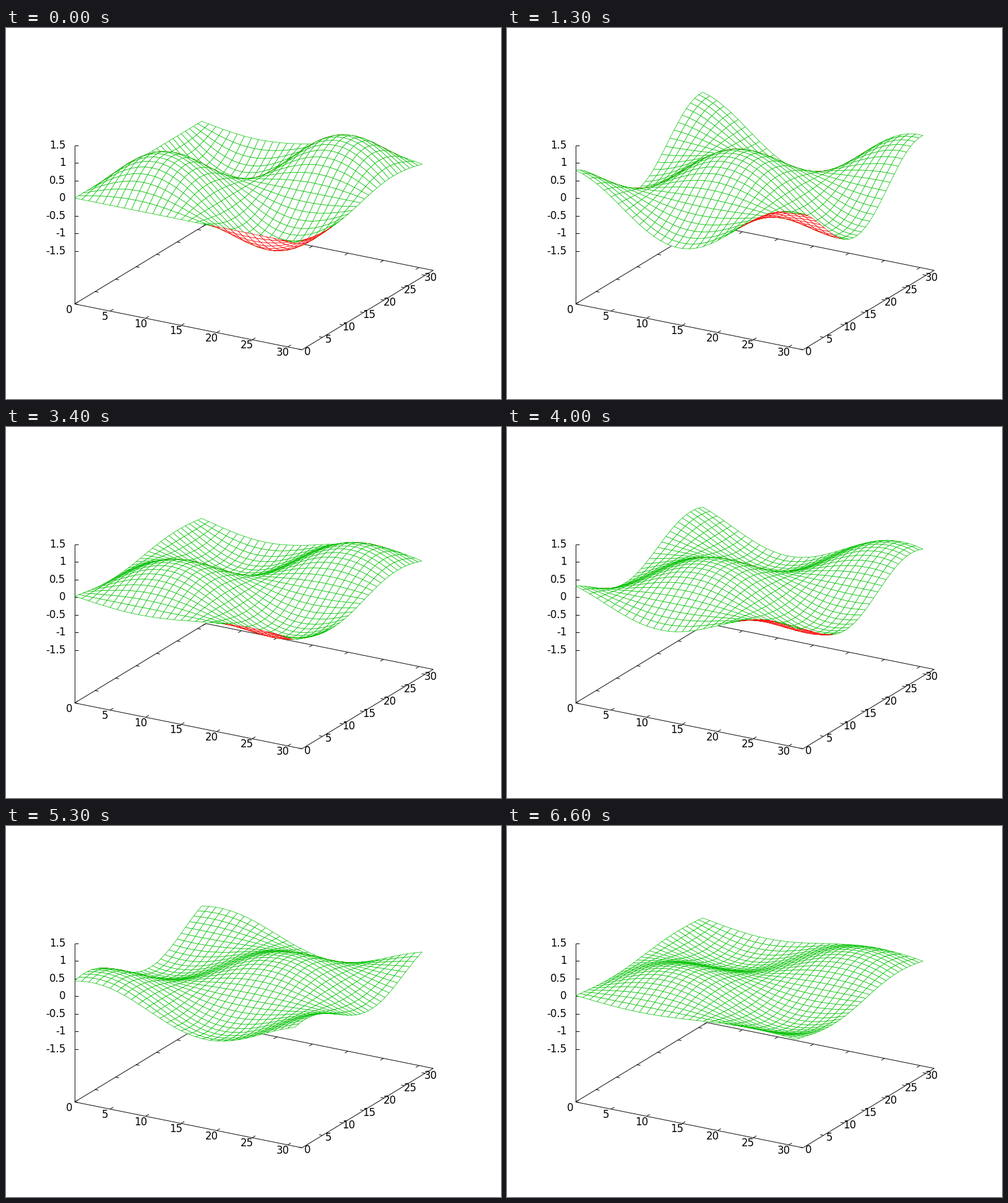
Animation, 800 px wide and 600 px high, one loop 6700 ms. Source, as a matplotlib script:

```python
import numpy as np
import matplotlib.pyplot as plt
from matplotlib.animation import FuncAnimation
from matplotlib.collections import LineCollection, PolyCollection

W, H, DPI = 800, 600, 100
PX = 72 / DPI
N = 32
FRAMES, INTERVAL = 67, 100
GREEN, RED = "#00c000", "#ff0000"

# Orthographic view: screen pixels per data unit along each axis
ORIGIN = np.array([110.4, 274.6])
EX = np.array([367.4, 74.1]) / N
EY = np.array([212.1, -128.4]) / N
EZ = np.array([0, -57.06])
FLOOR = -3


def project(x, y, z):
    x, y, z = (np.asarray(v, float)[..., None] for v in (x, y, z))
    return ORIGIN + x * EX + y * EY + z * EZ


def unit(v):
    return v / np.hypot(*v)


fig = plt.figure(figsize=(W / DPI, H / DPI), dpi=DPI, facecolor="white")
ax = fig.add_axes([0, 0, 1, 1])
ax.set_xlim(-0.5, W - 0.5)
ax.set_ylim(H - 0.5, -0.5)
ax.axis("off")


def label(x, y, text, ha="center"):
    ax.text(x, y + 6, text, ha=ha, va="baseline", color="black",
            family="DejaVu Sans", fontsize=12)


def draw_axes():
    base = [project(x, y, FLOOR)
            for x, y in ((0, 0), (N, 0), (N, N), (0, N), (0, 0))]
    segs = [base, [project(0, 0, FLOOR), project(0, 0, 1.5)]]
    along_x, along_y = 5.5 * unit(EX), 6 * unit(EY)

    for v in range(0, 31, 5):
        front, back = project(v, 0, FLOOR), project(v, N, FLOOR)
        left, right = project(0, v, FLOOR), project(N, v, FLOOR)
        segs += [[front, front + along_y], [back, back - along_y],
                 [left, left + along_x], [right, right - along_x]]
        label(front[0] - 8.3, front[1] + 8.3, str(v))
        label(right[0] + 9.3, right[1] + 3, str(v))

    for z in np.arange(-1.5, 1.6, 0.5):
        p = project(0, 0, z)
        segs.append([p, p + [6, 0]])
        label(95.8, p[1] - 1, f"{z:g}", ha="right")

    ax.add_collection(LineCollection(segs, colors="black",
                                     linewidths=0.95 * PX, zorder=1))


draw_axes()

# Shared edges are stroked by both neighbours, so the pen is a little thin
mesh = PolyCollection([], facecolors="white", linewidths=0.7 * PX, zorder=3)
ax.add_collection(mesh, autolim=False)

ix = np.arange(N)
X, Y = np.meshgrid(ix, ix)
# Cells from far to near: y falling, x rising
CY, CX = (c.ravel() for c in np.mgrid[N - 2:-1:-1, 0:N - 1])


def height(n):
    """Egg-crate wave drifting diagonally half a cell per step and decaying."""
    wave = np.sin(2 * np.pi * (ix - n / 2) / N)
    return np.exp(-0.0114 * n) * np.outer(wave, wave)


def update(n):
    p = project(X, Y, height(n))
    quads = np.stack([p[CY, CX], p[CY, CX + 1],
                      p[CY + 1, CX + 1], p[CY + 1, CX]], axis=1)
    d1, d2 = quads[:, 2] - quads[:, 0], quads[:, 3] - quads[:, 1]
    top = d1[:, 0] * d2[:, 1] - d1[:, 1] * d2[:, 0] < 0
    mesh.set_verts(quads)
    mesh.set_edgecolor(np.where(top, GREEN, RED).tolist())
    return [mesh]


anim = FuncAnimation(fig, update, frames=FRAMES, interval=INTERVAL,
                     repeat=True, repeat_delay=0, blit=False)
plt.show()
```
